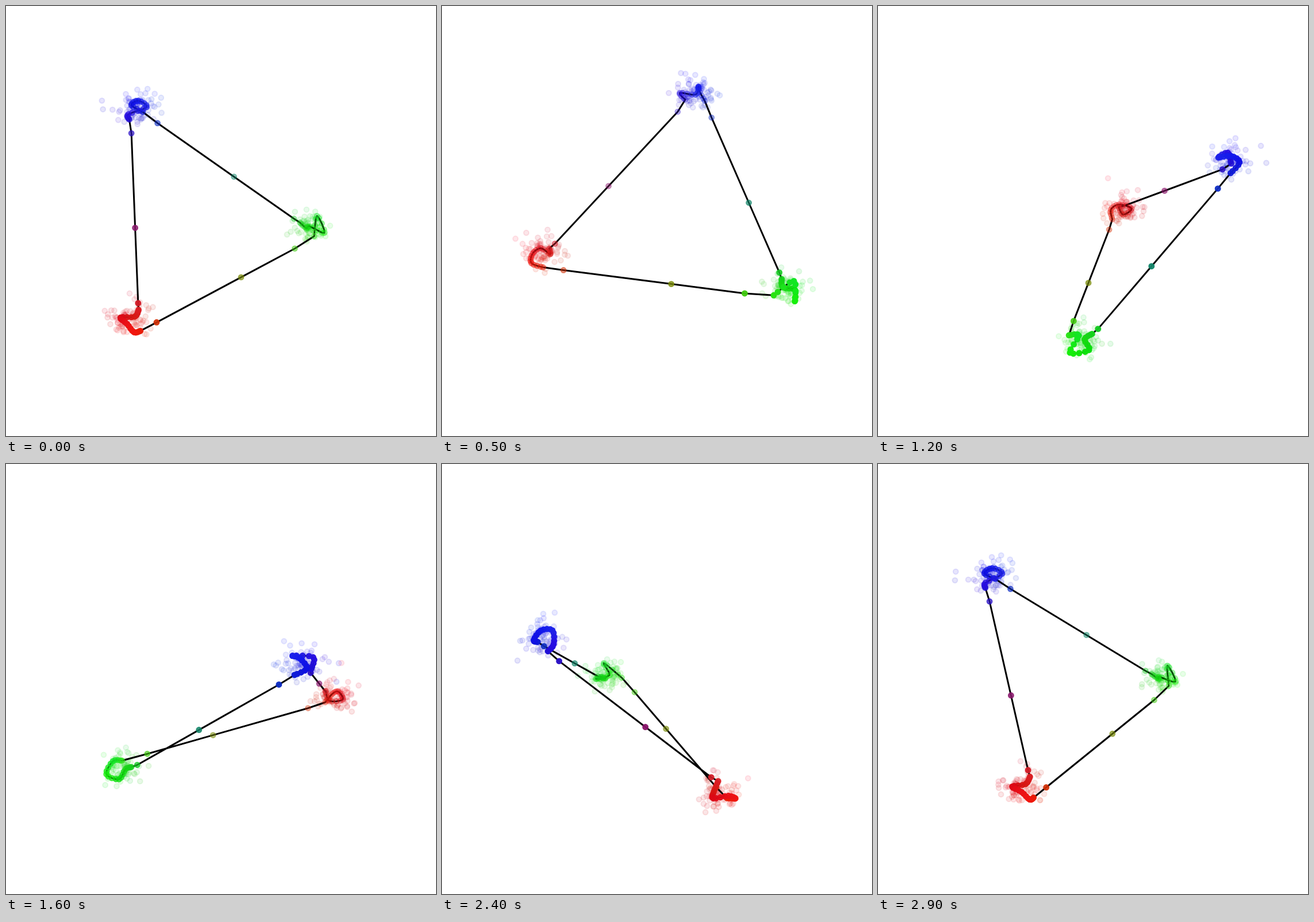
Recreate the animation shown at these times as an HTML page with a canvas. Size 748 px wide and 748 px high, loop 3000 ms.

```html
<!DOCTYPE html>
<html lang="en">
<head>
<meta charset="utf-8">
<title>Rotating ring through three clusters</title>
<style>
html, body { margin: 0; width: 100%; height: 100%; overflow: hidden; background: #fff; }
canvas { display: block; }
</style>
</head>
<body>
<canvas id="stage" width="748" height="748"></canvas>
<script>
const ctx = document.getElementById('stage').getContext('2d');
const STEP_MS = 100, STEPS = 30;
const CENTER_X = 384.5, CENTER_Y = 364.5, CAMERA = 4043;
const COS_ELEV = Math.cos(Math.PI / 6), SIN_ELEV = 0.5;
const MARKER_R = 4.47, NODES_PER_BEND = 4;
const CLOUD_SIZE = 75, CLOUD_ALPHA = 0.1, CLOUD_SPREAD = [17, 17, 13];

// x points to the viewer at angle 0, y to the right, z up.
// The ring enters a cluster, bends through it, leaves, and meets a
// middle node at the fraction `bridge` of the way to the next cluster.
const clusters = [
  {
    center: [-157, 152, -115], enter: [-165, 122, -102], leave: [-94, 122, -123], bridge: 0.4,
    bends: [[-163, 133, -109], [-158, 145, -118], [-179, 151, -126],
            [-162, 178, -130], [-168, 164, -98], [-131, 158, -119]]
  },
  {
    center: [155, -163, -113], enter: [135, -121, -134], leave: [135, -152, -95], bridge: 0.435,
    bends: [[162, -148, -134], [180, -158, -125], [171, -170, -114],
            [148, -182, -116], [142, -158, -118], [147, -151, -101]]
  },
  {
    center: [-156, -158, 128], enter: [-128, -169, 94], leave: [-172, -124, 91], bridge: 0.555,
    bends: [[-146, -173, 112], [-135, -174, 128], [-149, -142, 135],
            [-164, -157, 140], [-172, -170, 127], [-173, -150, 113]]
  }
];

function lerp(a, b, t) {
  return a.map((v, i) => v + (b[i] - v) * t);
}

// Catmull-Rom curve through the given points.
function smooth(points) {
  const at = i => points[Math.max(0, Math.min(points.length - 1, i))];
  const nodes = [];
  for (let k = 0; k <= (points.length - 1) * NODES_PER_BEND; k++) {
    const i = Math.floor(k / NODES_PER_BEND), t = k / NODES_PER_BEND - i;
    const [a, b, c, d] = [at(i - 1), at(i), at(i + 1), at(i + 2)];
    nodes.push(b.map((v, j) => v + t / 2 * (c[j] - a[j]
      + t * (2 * a[j] - 5 * v + 4 * c[j] - d[j]
      + t * (3 * (v - c[j]) + d[j] - a[j])))));
  }
  return nodes;
}

const ring = clusters.flatMap(({ enter, bends, leave, bridge }, i) => {
  const next = clusters[(i + 1) % clusters.length];
  return [enter, ...smooth(bends), leave, lerp(leave, next.enter, bridge)];
});

let seed = 20;
function random() {
  seed = (seed * 16807) % 2147483647;
  return seed / 2147483647;
}

function gaussian() {
  return Math.sqrt(-2 * Math.log(random())) * Math.cos(2 * Math.PI * random());
}

const cloud = clusters.flatMap(({ center }) =>
  Array.from({ length: CLOUD_SIZE }, () =>
    center.map((v, i) => v + CLOUD_SPREAD[i] * gaussian())));

function channel(value) {
  return Math.round(255 * Math.min(1, Math.max(0, value)));
}

// The position in the box gives the colour.
function colorOf([x, y, z]) {
  const r = channel(0.49 + 0.0025 * x);
  const g = channel(0.49 + 0.0025 * y);
  const b = channel(0.465 + 0.0033 * z);
  return `rgb(${r},${g},${b})`;
}

function project(point, angle) {
  const [x, y, z] = point;
  const c = Math.cos(angle), s = Math.sin(angle);
  const near = y * s + x * c;
  const depth = near * COS_ELEV + z * SIN_ELEV;
  const w = 1 - depth / CAMERA;
  return {
    x: CENTER_X + (y * c - x * s) / w,
    y: CENTER_Y - (z * COS_ELEV - near * SIN_ELEV) / w,
    depth,
    color: colorOf(point)
  };
}

function drawMarker({ x, y, color }, alpha) {
  ctx.globalAlpha = alpha;
  ctx.fillStyle = ctx.strokeStyle = color;
  ctx.lineWidth = 2;
  ctx.beginPath();
  ctx.arc(x, y, MARKER_R, 0, 2 * Math.PI);
  ctx.fill();
  ctx.stroke();
}

function drawRing(points) {
  ctx.globalAlpha = 1;
  ctx.strokeStyle = '#000';
  ctx.lineWidth = 3;
  ctx.lineJoin = 'round';
  ctx.beginPath();
  points.forEach(p => ctx.lineTo(p.x, p.y));
  ctx.closePath();
  ctx.stroke();
}

const farFirst = (a, b) => a.depth - b.depth;

function draw(angle) {
  ctx.globalAlpha = 1;
  ctx.fillStyle = '#fff';
  ctx.fillRect(0, 0, 748, 748);

  cloud.map(p => project(p, angle)).sort(farFirst)
    .forEach(p => drawMarker(p, CLOUD_ALPHA));

  const nodes = ring.map(p => project(p, angle));
  drawRing(nodes);

  nodes.sort(farFirst);
  const far = nodes[0].depth, near = nodes[nodes.length - 1].depth;
  nodes.forEach(p => drawMarker(p, 0.3 + 0.7 * (p.depth - far) / (near - far)));
}

let start = null, shown = 0;
function tick(now) {
  if (start === null) start = now;
  const step = Math.floor((now - start) / STEP_MS) % STEPS;
  if (step !== shown) {
    shown = step;
    draw(step / STEPS * 2 * Math.PI);
  }
  requestAnimationFrame(tick);
}
draw(0);
requestAnimationFrame(tick);
</script>
</body>
</html>
```
